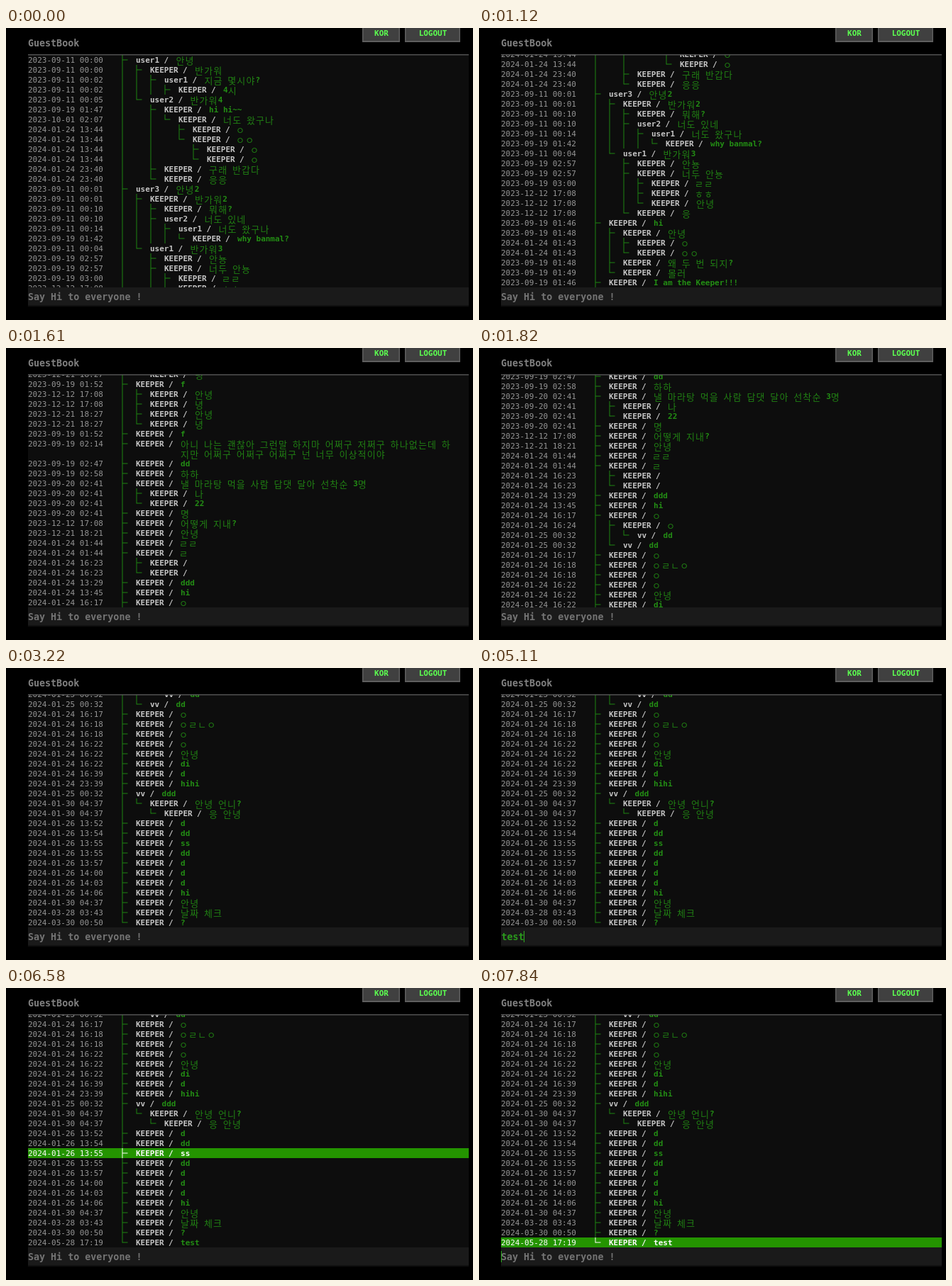
These frames come from a looping animation (658 by 412 pixels, 8000 ms). An HTML page:

```html
<!DOCTYPE html>
<html lang="ko">
<head>
<meta charset="utf-8">
<title>GuestBook</title>
<style>
html, body { margin: 0; width: 100%; height: 100%; overflow: hidden; background: #000; }
svg { display: block; width: 658px; height: 412px; }
text { font: 11px "DejaVu Sans Mono", "Noto Sans CJK KR", "Noto Sans CJK", monospace; white-space: pre; }
.date { fill: #959595; }
.name { fill: #c6c6c6; font-weight: bold; }
.msg { fill: #238e14; font-weight: bold; }
.ko {
  font: 300 13px "Noto Sans CJK KR", "Noto Sans CJK", sans-serif;
  letter-spacing: 1.15px; baseline-shift: -1.6px; fill-opacity: .88;
}
.tree { fill: none; stroke: #1f8512; }
.bar { fill: none; }
.on .bar { fill: #249400; }
.on text { fill: #fff; }
.on .tree { stroke: #fff; }
.big { font-size: 13.33px; font-weight: bold; }
.btn { fill: #5cff50; font-weight: bold; text-anchor: middle; }
</style>
</head>
<body>
<svg viewBox="0 0 658 412">
  <defs><clipPath id="view"><rect x="31" y="38" width="621" height="328"/></clipPath></defs>
  <rect width="658" height="412"/>
  <g id="buttons"></g>
  <text class="big" x="31" y="26" fill="#808080">GuestBook</text>
  <rect x="31" y="38" width="621" height="328" fill="#0d0d0d"/>
  <g clip-path="url(#view)"><g id="list"></g></g>
  <rect x="31" y="37.3" width="621" height="1" fill="#767676"/>
  <rect x="31" y="366" width="621" height="26" fill="#1a1a1a"/>
  <rect x="31" y="391" width="621" height="2" fill="#101010"/>
  <text id="hint" class="big" x="31" y="384" fill="#747474">Say Hi to everyone !</text>
  <text id="typed" class="big" x="31.5" y="384" fill="#2a9a1c"></text>
  <rect id="caret" y="371" width="1" height="16" fill="#2fae20"/>
</svg>
<script>
const LOOP = 8000, STEP = 70, ROW = 14, CHAR = 6.62;
const NAMES = { K: "KEEPER", 1: "user1", 2: "user2", 3: "user3", v: "vv" };

// date, time, tree branches, author, message ("/" wraps the line)
const POSTS = `
2023-09-11 00:00 + 1 안녕
2023-09-11 00:00 |+ K 반가워
2023-09-11 00:02 ||+ 1 지금 몇시야?
2023-09-11 00:02 |||+ K 4시
2023-09-11 00:05 |L 2 반가워4
2023-09-19 01:47 |.+ K hi hi~~
2023-10-01 02:07 |.|L K 너도 왔구나
2024-01-24 13:44 |.|.+ K ㅇ
2024-01-24 13:44 |.|.L K ㅇㅇ
2024-01-24 13:44 |.|..+ K ㅇ
2024-01-24 13:44 |.|..L K ㅇ
2024-01-24 23:40 |.+ K 구래 반갑다
2024-01-24 23:40 |.L K 응응
2023-09-11 00:01 + 3 안녕2
2023-09-11 00:01 |+ K 반가워2
2023-09-11 00:10 ||+ K 뭐해?
2023-09-11 00:10 ||+ 2 너도 있네
2023-09-11 00:14 |||+ 1 너도 왔구나
2023-09-19 01:42 ||||L K why banmal?
2023-09-11 00:04 |L 1 반가워3
2023-09-19 02:57 |.+ K 안뇽
2023-09-19 02:57 |.+ K 너두 안뇽
2023-09-19 03:00 |.|+ K ㄹㄹ
2023-12-12 17:08 |.|+ K ㅎㅎ
2023-12-12 17:08 |.|L K 안녕
2023-12-12 17:08 |.L K 응
2023-09-19 01:46 + K hi
2023-09-19 01:48 |+ K 안녕
2024-01-24 01:43 ||+ K ㅇ
2024-01-24 01:43 ||L K ㅇㅇ
2023-09-19 01:48 |+ K 왜 두 번 되지?
2023-09-19 01:49 |L K 몰러
2023-09-19 01:46 + K I am the Keeper!!!
2023-09-19 01:46 + K Hi again.
2023-09-19 01:49 + K Me too
2023-09-19 01:52 + K dd
2023-12-21 18:27 |+ K 안녕
2023-12-21 18:27 |L K 녕
2023-09-19 01:52 + K f
2023-12-12 17:08 |+ K 안녕
2023-12-12 17:08 |+ K 녕
2023-12-21 18:27 |+ K 안녕
2023-12-21 18:27 |L K 녕
2023-09-19 01:52 + K f
2023-09-19 02:14 + K 아니 나는 괜찮아 그런말 하지마 어쩌구 저쩌구 하나없는데 하/지만 어쩌구 어쩌구 어쩌구 넌 너무 이상적이야
2023-09-19 02:47 + K dd
2023-09-19 02:58 + K 하하
2023-09-20 02:41 + K 낼 마라탕 먹을 사람 답댓 달아 선착순 3명
2023-09-20 02:41 |+ K 나
2023-09-20 02:41 |L K 22
2023-09-20 02:41 + K 명
2023-12-12 17:08 + K 어떻게 지내?
2023-12-21 18:21 + K 안녕
2024-01-24 01:44 + K ㄹㄹ
2024-01-24 01:44 + K ㄹ
2024-01-24 16:23 |+ K
2024-01-24 16:23 |L K
2024-01-24 13:29 + K ddd
2024-01-24 13:45 + K hi
2024-01-24 16:17 + K ㅇ
2024-01-24 16:24 |+ K ㅇ
2024-01-25 00:32 ||L v dd
2024-01-25 00:32 |L v dd
2024-01-24 16:17 + K ㅇ
2024-01-24 16:18 + K ㅇㄹㄴㅇ
2024-01-24 16:18 + K ㅇ
2024-01-24 16:22 + K ㅇ
2024-01-24 16:22 + K 안녕
2024-01-24 16:22 + K di
2024-01-24 16:39 + K d
2024-01-24 23:39 + K hihi
2024-01-25 00:32 + v ddd
2024-01-30 04:37 |L K 안녕 언니?
2024-01-30 04:37 |.L K 응 안녕
2024-01-26 13:52 + K d
2024-01-26 13:54 + K dd
2024-01-26 13:55 + K ss
2024-01-26 13:55 + K dd
2024-01-26 13:57 + K d
2024-01-26 14:00 + K d
2024-01-26 14:03 + K d
2024-01-26 14:06 + K hi
2024-01-30 04:37 + K 안녕
2024-03-28 03:43 + K 날짜 체크
2024-03-30 00:50 L K ?
2024-05-28 17:19 L K test`.trim().split("\n");

const $ = id => document.getElementById(id);

// Hangul takes two cells; lone consonants sit at the left of theirs
const korean = text => text
  .replace(/^[ㄱ-ㅎ]+/, s => `<tspan class="ko" dx="-2">${s}</tspan>`)
  .replace(/[가-힣]+/g, s => `<tspan class="ko">${s}</tspan>`);

const label = (cls, x, y, text) => `<text class="${cls}" x="${x}" y="${y}">${text}</text>`;

function branch(mark, depth, height) {
  const x = 164 + 20 * depth, mid = 7;
  if (mark === ".") return "";
  if (mark === "|") return `M${x} 0V${height}`;
  return `M${x} 0V${mark === "+" ? height : mid + .5}M${x} ${mid}H${x + 7.5}`;
}

let slot = 0;
$("list").innerHTML = POSTS.map(post => {
  const [day, time, tree, who, ...words] = post.split(" ");
  const lines = words.join(" ").split("/");
  const height = ROW * lines.length, top = 38 + ROW * slot;
  const x = 163 + 20 * tree.length, name = NAMES[who];
  const slash = x + name.length * CHAR + 6.3;
  slot += lines.length;
  return `<g transform="translate(0 ${top})">
    <rect class="bar" x="31" width="621" height="${height}"/>
    <path class="tree" d="${[...tree].map((m, i) => branch(m, i, height)).join("")}"/>
    ${label("date", 31, 11, day + " " + time)}${label("name", x, 11, name)}${label("name", slash, 11, "/")}
    ${lines.map((s, i) => label("msg", slash + 17, 11 + ROW * i, korean(s))).join("")}</g>`;
}).join("");

$("buttons").innerHTML = [["KOR", 502, 53], ["LOGOUT", 562, 78]].map(([text, x, w]) => `
  <rect x="${x}" width="${w}" height="20" fill="#5e5e5e"/>
  <rect x="${x + 1.5}" width="${w - 3}" height="18" fill="#404040"/>
  ${label("btn", x + w / 2 + .5, 11, text)}`).join("");

const SCROLL = [[980, 0], [1400, 402], [1820, 649], [1960, 876]];
const POSTED = 5530;
const TYPED = [[0, ""], [4900, "t"], [4970, "te"], [5040, "tes"], [5110, "test"], [5250, ""]];
const CARET = [[0, 0], [3920, 1], [4410, 0], [4830, 1], [5600, 0], [6090, 1], [6580, 0], [7070, 1], [7560, 0], [7840, 1]];
// highlighted row, counted from the bottom; -1 is none
const HOVER = [[0, -1], [6090, 3], [6160, 5], [6230, 6], [6440, 7], [6510, 8], [6580, 9],
  [6860, 8], [6930, 6], [7000, 4], [7070, 2], [7140, 0]];

const at = (table, t) => table.findLast(([start]) => start <= t)[1];

function scrollAt(t) {
  if (t >= POSTED) return 876 + ROW;
  const next = SCROLL.findIndex(([time]) => time > t);
  if (next < 0) return 876;
  if (next === 0) return 0;
  const [t0, y0] = SCROLL[next - 1], [t1, y1] = SCROLL[next];
  return Math.round(y0 + (y1 - y0) * (t - t0) / (t1 - t0));
}

const rows = [...$("list").children];
const [previous, newest] = rows.slice(-2);

function render(t) {
  const typed = at(TYPED, t), hover = at(HOVER, t), posted = t >= POSTED;
  $("list").setAttribute("transform", `translate(0 ${-scrollAt(t - t % STEP)})`);
  newest.style.display = posted ? "" : "none";
  previous.querySelector(".tree").setAttribute("d", branch(posted ? "+" : "L", 0, ROW));
  rows.forEach((row, i) => row.classList.toggle("on", rows.length - 1 - i === hover));
  $("typed").textContent = typed;
  $("hint").style.display = typed ? "none" : "";
  $("caret").style.display = at(CARET, t) ? "" : "none";
  $("caret").setAttribute("x", 31 + Math.round(typed.length * 8.03));
}

const start = performance.now();
function tick() {
  render((performance.now() - start) % LOOP);
  requestAnimationFrame(tick);
}
tick();
</script>
</body>
</html>
```
